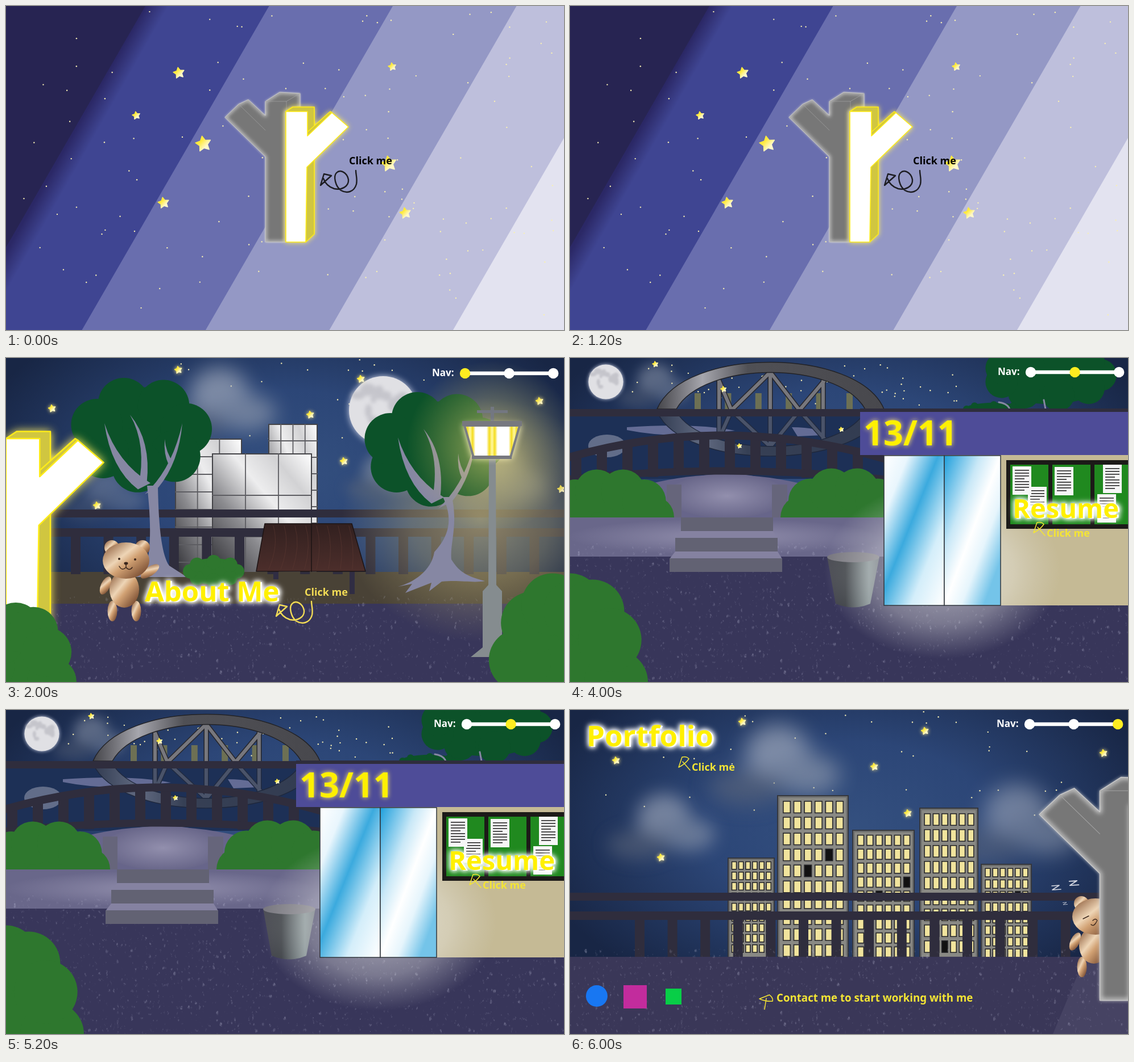
An HTML page for the animation above (8000 ms loop, 981 by 571 pixels).

```html
<!DOCTYPE html>
<html lang="en">
<head>
<meta charset="utf-8">
<title>Night walk</title>
<style>
html, body { margin: 0; width: 100%; height: 100%; overflow: hidden; }
svg { display: block; width: 100vw; height: 100vh; }
text { font: 700 18px "Noto Sans", "Open Sans", sans-serif; }
.title { fill: #fff000; filter: drop-shadow(3px 1px 0 #fff) drop-shadow(0 0 4px #fff) drop-shadow(0 0 4px #fff); }
.sign { fill: #fff000; filter: drop-shadow(0 0 4px #ffe96b); }
</style>
</head>
<body>
<svg id="stage" viewBox="0 0 981 571" preserveAspectRatio="none"></svg>
<script>
const W = 981, H = 571, SLOT = 2000;
const RAIL = '#2f2d3d', LEAF = '#0c5229', BUSH = '#2e772e', BARK = '#8687a3', INK = '#3a261c', GOLD = '#f4e534';

// Drawing helpers
const rect = (x, y, w, h, fill, more = '') =>
  `<rect x="${x}" y="${y}" width="${w}" height="${h}" fill="${fill}" ${more}/>`;
const oval = (x, y, rx, ry, fill, more = '') =>
  `<ellipse cx="${x}" cy="${y}" rx="${rx}" ry="${ry}" fill="${fill}" ${more}/>`;
const path = (d, fill, more = '') => `<path d="${d}" fill="${fill}" ${more}/>`;
const line = (d, color, width, more = '') =>
  path(d, 'none', `stroke="${color}" stroke-width="${width}" stroke-linejoin="round" stroke-linecap="round" ${more}`);
const text = (x, y, str, fill, size = 18, cls = '') =>
  `<text x="${x}" y="${y}" fill="${fill}" style="font-size:${size}px" class="${cls}">${str}</text>`;
const group = (move, body) => `<g transform="${move}">${body}</g>`;
const glow = (size, color, body) => `<g style="filter:drop-shadow(0 0 ${size}px ${color})">${body}</g>`;
const repeat = (n, make) => Array.from({ length: n }, (_, i) => make(i)).join('');

function seeded(n) {
  return () => (n = (n * 16807) % 2147483647) / 2147483647;
}

function dots(n, seed, x, y, w, h) {
  const rand = seeded(seed * 99991);
  return repeat(n, () => oval(x + w * rand(), y + h * rand(), 1.2, 1.2, '#f7efb4'));
}

function star(x, y, r) {
  const pts = repeat(10, i => {
    const a = i * Math.PI / 5 - 1.75, d = i % 2 ? r * .52 : r;
    return `${x + d * Math.cos(a)},${y + d * Math.sin(a)} `;
  });
  return `<polygon points="${pts}" fill="url(#star)" stroke="url(#star)" stroke-width="1.5" stroke-linejoin="round"/>`;
}

// A leafy mass: round lumps set along an ellipse
function puff(fill, x, y, rx, ry, n = 8, turn = 0) {
  const r = Math.min(rx, ry) * .44;
  return oval(x, y, rx - r * .45, ry - r * .45, fill) + repeat(n, i => {
    const a = turn + i * 2 * Math.PI / n;
    return oval(x + (rx - r) * Math.cos(a), y + (ry - r) * Math.sin(a), r, r, fill);
  });
}

// A branch that widens from its tip to width w at its base
const limb = (tx, ty, cx, cy, x, y, w) =>
  path(`M${tx} ${ty}Q${cx + w / 4} ${cy - w / 4} ${x + w / 2} ${y - w / 4}L${x - w / 2} ${y + w / 4}Q${cx - w / 4} ${cy + w / 4} ${tx} ${ty}Z`, BARK);

// Paints
const stops = list => list.map(([at, color, alpha = 1]) =>
  `<stop offset="${at}" stop-color="${color}" stop-opacity="${alpha}"/>`).join('');
const linear = (id, [x1, y1, x2, y2], list, more = '') =>
  `<linearGradient id="${id}" x1="${x1}" y1="${y1}" x2="${x2}" y2="${y2}" ${more}>${stops(list)}</linearGradient>`;
const radial = (id, list, more = '') => `<radialGradient id="${id}" ${more}>${stops(list)}</radialGradient>`;
const GREY_EDGE = 'M385 196 409 173 426 165 456 193V168L481 152 517 154V180L492 186V416H456V266Z';

const defs = `<defs>
${linear('star', [0, 0, 1, 1], [[.35, '#ffea3d'], [.7, '#fff8c9']])}
${linear('dusk', [246, 0, 276, 17], [[0, '#2b2866'], [1, '#3f4592']], 'gradientUnits="userSpaceOnUse"')}
${linear('tower', [0, 1, 1, 0], [[0, '#2c2c31'], [.35, '#8b8b8f'], [.6, '#ededee'], [.8, '#d2d2d4'], [1, '#fff']])}
${linear('fur', [0, 0, 1, 1], [[.1, '#9a6d4c'], [.4, '#eed5b6'], [.55, '#d2a274'], [.9, '#75492f']])}
${linear('wood', [0, 0, 0, 1], [[0, '#32201f'], [1, '#4c2e2b']])}
${linear('steel', [0, 0, 1, 0], [[0, '#45454a'], [.2, '#a6a6ad'], [.4, '#505055'], [1, '#48484d']])}
${linear('paneL', [0, 0, 1, 1], [[0, '#fff'], [.2, '#e9f6fd'], [.45, '#3baade'], [.72, '#d4eefa'], [1, '#fff']])}
${linear('paneR', [0, 0, 1, 1], [[0, '#1e9fdc'], [.32, '#c9e8f7'], [.5, '#fff'], [.65, '#e6f5fc'], [.85, '#74c4e9']])}
${linear('bin', [0, 0, 1, 0], [[0, '#4c4d55'], [.35, '#393d42'], [.8, '#7e8c8e'], [1, '#606870']])}
${linear('bulb', [.3, 0, .5, 0], [[0, '#fff'], [.5, '#fff'], [.75, '#f4dc20'], [1, '#fff8a0']], 'spreadMethod="reflect"')}
${radial('sky', [[0, '#34507f'], [.45, '#2c4677'], [1, '#182645']], 'cx=".5" cy=".36" r=".58"')}
${radial('haze', [[0, '#c9bb84', .62], [.5, '#b9ac78', .4], [1, '#a99e72', 0]])}
${radial('lamp', [[0, '#f2e27a', .6], [1, '#cfc060', 0]])}
${radial('door', [[0, '#fff', .6], [.6, '#eee', .36], [1, '#ddd', 0]])}
${radial('stone', [[0, '#928fad'], [1, '#69678a']])}
<filter id="cloud" x="-50%" y="-50%" width="200%" height="200%"><feGaussianBlur stdDeviation="17"/></filter>
<filter id="soft"><feGaussianBlur stdDeviation="3"/></filter>
<filter id="grain"><feTurbulence baseFrequency=".16 .1" numOctaves="2" seed="4"/>
<feColorMatrix values="0 0 0 0 .55  0 0 0 0 .55  0 0 0 0 .72  0 3 0 0 -1.4"/></filter>
<clipPath id="greyCut"><path d="${GREY_EDGE}"/></clipPath>
</defs>`;

// Shared scenery
const greyHalf = () => glow(2, '#ccc', path(GREY_EDGE, '#777')) +
  `<g clip-path="url(#greyCut)">${line(GREY_EDGE, '#ddd', 4, 'filter="url(#soft)"')}</g>` +
  line(GREY_EDGE, '#c8c8c8', 1) + line('M409 173 456 219M456 168H493V186M493 168 517 154', '#a2a2a2', .7);

const whiteHalf = () => glow(5, '#ffee62', '<g stroke="#ffec18" stroke-width="1.6" stroke-linejoin="round">' +
  path('M492 186 504 178H542V402L527 416Z', '#d0c640') + path('M530 222 570 186 573 188 530 231Z', '#d0c640') +
  path('M492 186H530V229L573 188 602 213 529 284 527 416H492Z', '#fff') + '</g>');

const doodle = (x, y, color) => group(`translate(${x} ${y})`, line(
  'M615 290C615 298 618 304 616 314C612 328 599 331 589 325C579 318 575 300 581 294C588 287 600 294 602 306C603 318 590 325 577 322C567 319 561 312 558 304M553 316 559 296 572 299Z',
  color, 2.4));
const pointer = (x, y, turn = 0) => group(`translate(${x} ${y}) rotate(${turn})`,
  line('M0 0 6 -18Q14 -20 18 -15 12 -6 0 0M7 -10 20 5', GOLD, 1.5));

const ground = (y, color = '#38365a') =>
  rect(0, y, W, H - y, color) + rect(0, y, W, H - y, color, 'filter="url(#grain)" opacity=".34"');

const cloud = (x, y, s, alpha) => group(`translate(${x} ${y}) scale(${s})`,
  `<g filter="url(#cloud)" opacity="${alpha}">` + oval(0, -10, 52, 48, '#b3b9c6') +
  oval(48, 22, 52, 32, '#9aa3b3') + oval(-50, 42, 60, 28, '#5e677a') + '</g>');

const night = () => rect(0, 0, W, H, 'url(#sky)') + dots(36, 5, 50, 0, 840, 190);
const nightStars = () => glow(3, '#ffe98a',
  [[303, 21], [81, 89], [160, 260], [535, 100], [594, 182], [624, 37], [938, 76]].map(([x, y]) => star(x, y, 6.5)).join(''));

function moon(x, y, s) {
  const rand = seeded(4242);
  const spots = repeat(14, () => {
    const a = 6.3 * rand(), d = 44 * Math.sqrt(rand());
    return oval(d * Math.cos(a) - 6, d * Math.sin(a) - 6, 5 + 9 * rand(), 4 + 9 * rand(), '#b4b4bc');
  });
  return group(`translate(${x} ${y}) scale(${s})`,
    glow(6, '#cdd3e6', oval(0, 0, 60, 60, '#e0e0e4')) + `<g opacity=".6" filter="url(#soft)">${spots}</g>`);
}

const fence = y => rect(0, y, W, 14, RAIL) + rect(0, y + 33, W, 15, RAIL) +
  repeat(15, i => rect(114 + 57.6 * i, y + 47, 17, 67, RAIL));

const nav = (x, y, active) => text(x - 58, y + 5, 'Nav:', '#fff', 17) + line(`M${x} ${y}h155`, '#fff', 6.5) +
  repeat(3, i => oval(x + 77.6 * i, y, 9.2, 9.2, i === active ? '#fdec20' : '#fff'));

function bear(asleep) {
  const part = (x, y, rx, ry, turn = 0) => oval(x, y, rx, ry, 'url(#fur)', `transform="rotate(${turn} ${x} ${y})"`);
  const face = asleep
    ? line('M189 361 199 356M206 364q5-5 8 0l-3 5q-4 6-8 2', INK, 1.4)
    : oval(199, 354, 2, 2, INK) + oval(227, 355, 2, 2, INK) + oval(211, 362, 3.5, 2.4, INK) +
      line('M211 363v6M199 367q5 9 12 2q6 7 11 0', INK, 1.5);
  return part(186, 334, 13, 13) + part(240, 334, 13, 13) + part(175, 401, 8, 17, 25) +
    (asleep ? '' : part(253, 376, 8, 19, 55)) + part(187, 446, 8.5, 18) + part(229, 446, 8.5, 18) +
    part(208, 408, 26, 32) + part(211, 357, 41, 32) + face;
}

const crown = () => puff(LEAF, 237, 134, 126, 103, 7, -1.95) +
  limb(173, 115, 190, 190, 243, 226, 22) + limb(218, 100, 252, 150, 240, 224, 15) +
  limb(310, 115, 298, 190, 256, 234, 24) + limb(279, 143, 279, 168, 290, 186, 8);

// Scenes
function openScene() {
  const band = (x, fill) => path(`M${x} 0 ${x - 329} ${H}H1400V0Z`, fill);
  const bands = ['url(#dusk)', '#696eae', '#9498c5', '#bebfdc', '#e3e3f0'];
  return rect(0, 0, W, H, '#272452') + bands.map((fill, i) => band(245 + 217.5 * i, fill)).join('') +
    dots(115, 3, 15, 10, 950, 550) +
    star(304, 118, 10) + star(229, 193, 7) + star(347, 243, 14) + star(277, 347, 10) +
    star(679, 107, 7) + star(673, 278, 14) + star(702, 365, 10) + greyHalf() + whiteHalf() +
    text(603, 279, 'Click me', '#000') + doodle(0, 0, '#1d1d22');
}

function parkScene() {
  const glass = (x, y, w, cols, row) => rect(x, y, w, 380 - y, 'url(#tower)', 'stroke="#444448" stroke-width="2"') +
    line(repeat(cols - 1, i => `M${x + w * (i + 1) / cols} ${y}V380`) +
      repeat(Math.floor((379 - y) / row), i => `M${x} ${y + row * (i + 1)}h${w}`), '#5d5d62', 1.8);
  return night() + cloud(375, 75, 1, .6) + cloud(175, 235, .7, .3) + moon(663, 92, 1) + cloud(860, 205, .9, .35) +
    cloud(660, 205, .6, .35) + nightStars() + star(976, 231, 6.5) +
    glass(298, 143, 116, 3, 31) + glass(462, 117, 85, 4, 29) + glass(363, 169, 174, 3, 73) +
    rect(0, 377, W, 57, '#494236') + fence(267) + ground(433) +
    oval(835, 285, 245, 215, 'url(#haze)') + crown() +
    path('M248 225C255 285 256 345 244 372L220 386H318L287 366C272 345 268 285 267 225Z', BARK) +
    group('translate(516 25)', crown()) +
    path('M768 245C790 290 773 320 753 342C748 375 716 396 689 403L714 398 702 414 748 396 744 411 766 394C800 391 820 397 842 393C806 384 795 374 783 355C780 328 795 295 784 245Z', BARK) +
    puff(BUSH, 365, 376, 54, 29) + rect(470, 376, 9, 14, '#302d43') + rect(604, 376, 9, 40, '#302d43') +
    path('M455 292H608L632 376H440Z', 'url(#wood)') + line('M455 292H608L632 376H440ZM537 292V376', '#1d1415', 1.5) +
    repeat(8, i => line(`M${470 + 19 * i} 296Q${480 + 19 * i} 330 ${462 + 21 * i} 372`, '#5c3933', 1, 'opacity=".6"')) +
    oval(855, 155, 150, 150, 'url(#lamp)') +
    path('M849 178H861L862 400 872 411V527H817L838 510V411L848 400Z', '#858c8f') +
    rect(852, 86, 6, 27, '#737781') + rect(828, 92, 54, 5, '#737781') +
    glow(6, '#fff7bd', path('M806 119H903L887 175H822Z', 'url(#bulb)', 'stroke="#7c7e83" stroke-width="4"')) +
    rect(802, 111, 105, 9, '#77787f') + rect(819, 172, 70, 6, '#77787f') +
    group('translate(0 142) scale(1.56) translate(-492 -186)', whiteHalf()) +
    puff(BUSH, 25, H, 99, 141, 11) + puff(BUSH, 971, H, 125, 193, 11) + bear(false) +
    text(244, 429, 'About Me', '#fff000', 49, 'title') + text(525, 419, 'Click me', '#f3dc55') +
    doodle(-78, 139, '#f3dc55') + nav(807, 27, 0);
}

function bridgeScene() {
  const truss = 'M262 40 283 90M286 90 352 25 402 90M352 25V90M447 40 405 90M445 40V90M262 40V90';
  const span = line(truss, '#26262b', 9) + line(truss, '#77777d', 6) +
    path('M153 90C200-20 505-20 552 90H519C470 4 235 4 187 90Z', 'url(#steel)', 'stroke="#222226" stroke-width="1.5"');
  const sheet = (x, y, h) => rect(x, y, 33, h, '#f6f6f6') +
    repeat(Math.floor(h / 5) - 2, i => rect(x + 4, y + 6 + 5 * i, i % 4 === 3 ? 17 : 25, 1.7, '#333'));
  // Each tread is a little wider than the one above it
  const stairs = repeat(3, i => {
    const x = 195 - 10 * i, y = 281 + 36 * i, w = 162 + 18 * i;
    return (i ? path(`M${x + 10} ${y - 12}h${w - 18}l8 13H${x}Z`, '#8582a1') : '') + rect(x, y, w, 24, '#626273');
  });
  const door = (x, w, fill) => rect(x, 172, w, 264, fill, 'stroke="#30363c" stroke-width="1.5"');
  return rect(0, 0, W, H, 'url(#sky)') + cloud(150, 45, .6, .4) + dots(65, 7, 105, 8, 600, 78) + moon(63, 42, .51) +
    repeat(6, i => rect(219 + 53.4 * i, 62, 11, 28, '#6d7054')) + span +
    rect(0, 103, 552, 110, '#1d3056') + oval(65, 155, 33, 20, '#8f97ac', 'opacity=".6"') +
    `<g opacity=".5">${path('M100 122Q220 114 290 128L205 136Q150 137 100 127ZM390 122Q440 122 445 136L400 138Z', '#aaa8d4')}${group('translate(0 180) scale(1 -.95)', span)}</g>` +
    star(150, 11, 5) + star(270, 55, 5) + star(298, 155, 4) + star(477, 126, 4) +
    path('M125 226Q270 185 425 226V281H125Z', '#67658a') + oval(276, 243, 106, 39, 'url(#stone)') +
    rect(170, 223, 26, 58, '#66657b') + rect(355, 223, 27, 58, '#66657b') +
    repeat(12, i => rect(2 + 45 * i, 134 + 37 * ((i - 5.9) / 6) ** 2, 18, 67, RAIL)) +
    line('M-5 176Q270 96 555 178', RAIL, 14) + line('M-5 214Q270 184 555 214', RAIL, 13) +
    puff(BUSH, 70, 281, 113, 87, 10) + puff(BUSH, 482, 281, 112, 89, 10) +
    rect(0, 281, 552, 70, '#69678a') + oval(270, 315, 275, 32, 'url(#stone)') + ground(350) + stairs +
    rect(0, 90, 510, 13, RAIL) + puff(LEAF, 843, 30, 118, 64, 9) + puff(LEAF, 745, 90, 54, 14) +
    line('M754 78Q769 80 773 90M833 74 836 90', BARK, 3) +
    rect(510, 89, 471, 7, RAIL) + rect(552, 171, 429, 265, '#c5ba95') + rect(510, 95, 471, 76, '#4e4c98') +
    path('M452 350H544L528 433Q498 446 467 433Z', 'url(#bin)') + oval(498, 351, 46, 9, '#77767e') +
    oval(655, 375, 208, 155, 'url(#door)') + door(552, 106, 'url(#paneL)') + door(658, 99, 'url(#paneR)') +
    rect(767, 180, 214, 121, '#1c1a18') + repeat(3, i => rect(774 + 74 * i, 188, 67, 105, '#20891f')) +
    sheet(805, 227, 42) + sheet(778, 191, 50) + sheet(852, 192, 50) + sheet(937, 188, 50) + sheet(927, 240, 50) +
    puff(BUSH, 10, H, 127, 193, 11) +
    text(516, 154, '13/11', '#fff000', 61, 'sign') + text(778, 282, 'Resume', '#fff000', 47, 'title') +
    pointer(815, 308) + text(838, 315, 'Click me', GOLD) + nav(810, 25, 1);
}

function cityScene() {
  // Six windows per floor, sized from the block; dark lists the unlit ones
  const block = (x, y, w, floor, dark = []) => {
    const lit = i => dark.includes(i) ? '#111' : '#f1e49d';
    const floors = Math.ceil((425 - y) / floor - .35);
    return rect(x, y, w, 436 - y, '#898984', 'stroke="#33353b" stroke-width="2"') +
      rect(x + 2, y + 2, w - 4, 434 - y, 'none', 'stroke="#55565a" stroke-width="3" opacity=".5"') +
      repeat(6 * floors, i => rect(x + w * (.08 + .15 * (i % 6)), y + floor * (.35 + Math.floor(i / 6)),
        w * .1, floor * .73, lit(i), 'stroke="#26262a" stroke-width="1.6"'));
  };
  const snore = (x, y, s) => group(`translate(${x} ${y}) scale(${s})`, line('M-7-3 6-4-6 4 9 3', '#d5d8e2', 1.6));
  return night() + cloud(365, 90, 1.1, .6) + cloud(165, 200, .9, .55) + cloud(785, 195, 1.1, .5) + nightStars() +
    block(278, 261, 81, 18.3) + block(365, 151, 124, 28.1, [22, 26]) + block(497, 212, 108, 24.6, [23, 26]) +
    block(615, 173, 102, 28, [50]) + block(723, 272, 88, 20.3, [16]) +
    fence(322) + ground(435, '#3a3758') + path('M905 436H981V571H849Z', '#807d98', 'opacity=".17"') +
    group('translate(713 7)', bear(true)) + snore(854, 313, 1) + snore(885, 305, 1.05) + snore(870, 341, .5) +
    group('translate(825 184) scale(1.5 1.49) translate(-385 -196)', greyHalf()) +
    text(29, 64, 'Portfolio', '#fff000', 51, 'title') + pointer(191, 101) + text(214, 107, 'Click me', GOLD) +
    oval(47, 504, 19, 19, '#1877f2') + rect(94, 485, 41, 41, '#c22c9d') + rect(168, 491, 28, 28, '#08ce47') +
    pointer(333, 509, 50) + text(363, 514, 'Contact me to start working with me', GOLD, 18.7) + nav(808, 25, 2);
}

const stage = document.getElementById('stage');
stage.innerHTML = defs + [openScene, parkScene, bridgeScene, cityScene]
  .map(draw => `<g class="scene" visibility="hidden">${draw()}</g>`).join('');
const scenes = [...stage.querySelectorAll('.scene')];

const start = performance.now();
function tick() {
  const now = Math.floor((performance.now() - start) / SLOT) % scenes.length;
  scenes.forEach((s, i) => s.setAttribute('visibility', i === now ? 'visible' : 'hidden'));
  requestAnimationFrame(tick);
}
tick();
</script>
</body>
</html>
```
